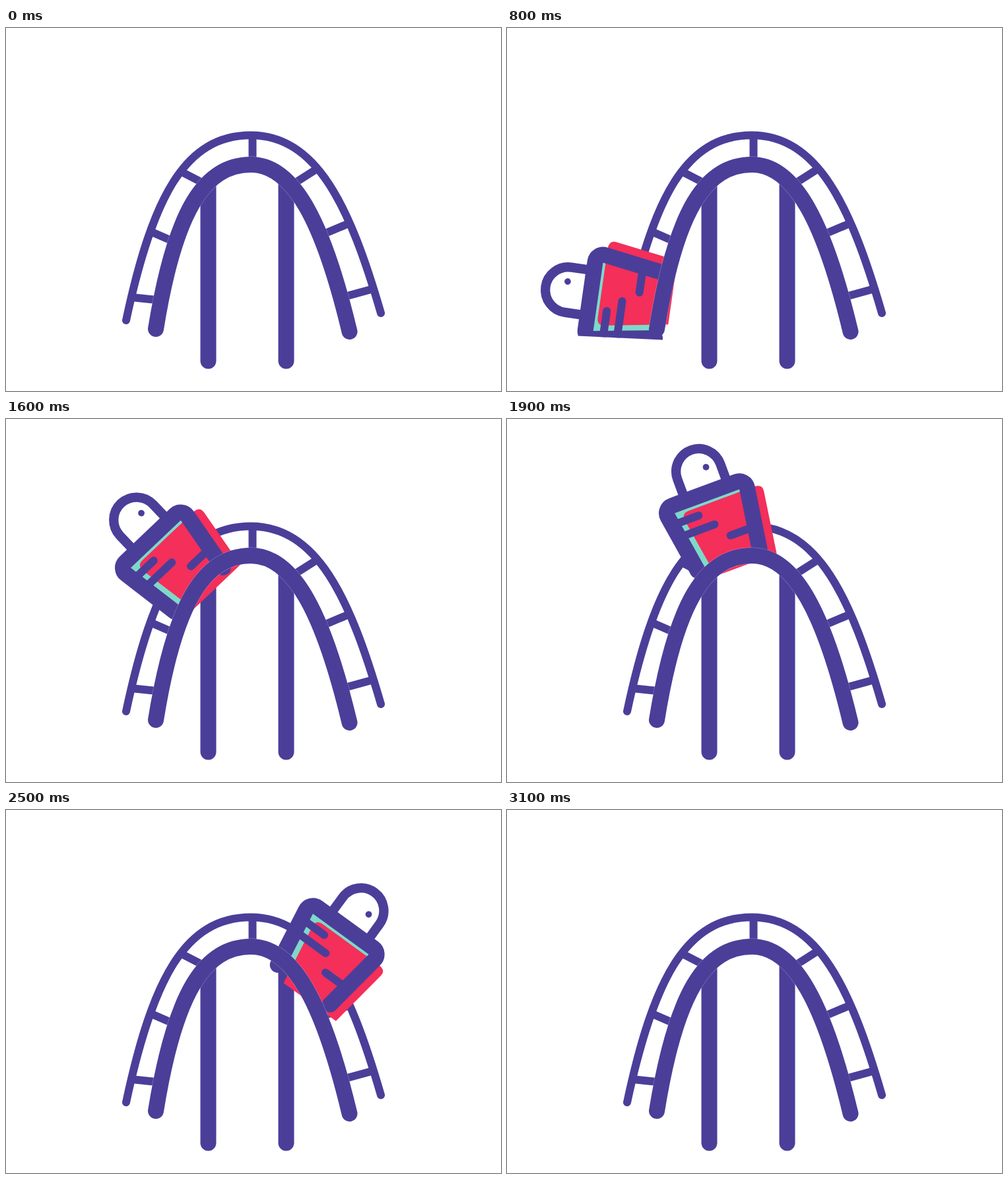
Animation of 750 by 550 pixels, one loop 3600 ms. Source, as an HTML page:

```html
<!DOCTYPE html>
<html lang="en">
<head>
<meta charset="utf-8">
<title>Bag on a roller coaster</title>
<style>
  html, body { margin: 0; width: 100%; height: 100%; overflow: hidden; background: #fff; }
  svg { display: block; width: 750px; height: 550px; }
  .line { fill: none; stroke: #4b3e99; stroke-linecap: round; }
  .thick { stroke-width: 24; }
  .thin { stroke-width: 12; }
  .flat { stroke-linecap: butt; }
  .rim { fill: none; stroke: #fff; stroke-opacity: .35; stroke-width: 25; }
</style>
</head>
<body>
<svg viewBox="0 0 750 550">
  <defs>
    <clipPath id="ground"><path id="edge"/></clipPath>
    <path id="rail" d="M227 456C256 276 301 207 371 207C436 207 481 295 520.5 460"/>
    <path id="ride" d="M161 538C190.5 279 271 152.5 371 152.5C482 152.5 556 335 578 520"/>
  </defs>

  <path class="line thick" d="M306.5 240V504.5M424.5 234V504.5"/>
  <path class="line thin" d="M182 443C222 256 271 162.5 371 162.5C471 162.5 521 270 568 432"/>
  <path class="line thin flat" d="M373.5 163V205M266 218L298 234.5M220 308.7L251 322.3M190 408L228 412
    M438 234.5L471 213.5M484 311L519 296.3M515 406.5L557 395"/>

  <g clip-path="url(#ground)">
    <g id="bag">
      <path fill="#7ed9c9" d="M329 108H438L424 206H344Z"/>
      <path fill="#f32f5a" d="M357 221L342 127Q340 114 352 114H457.5Q471.5 114 469.5 126L455 221Z"/>
      <path class="line flat" stroke-width="14.3" d="M353 98V63.5A34.5 34.5 0 0 1 422 63.5V98"/>
      <circle cx="400" cy="61" r="4.9" fill="#4b3e99"/>
      <path class="line thin" d="M328 126H364M330 147H382M399 171H436"/>
      <path class="line thick" d="M333.7 204L319.4 112A12 12 0 0 1 331.2 98H435.8A12 12 0 0 1 447.6 112L433 206"/>
    </g>
  </g>

  <use href="#rail" class="rim"/>
  <use href="#rail" class="line thick"/>
</svg>
<script>
const LOOP = 3600, STEP = 100;
const START = 200, TOP = 2100, END = 3100;
const [bag, edge, ride] = ['bag', 'edge', 'ride'].map(id => document.getElementById(id));

// Steady climb that brakes just before the top
function climb(t) {
  const time = Math.min(t, TOP);
  const brake = Math.max(0, time - 1900);
  return 475 * ((time - START) / (TOP - START)) ** 1.15 - 0.0008 * brake * brake;
}

// Eased run down the far side
function drop(t) {
  const u = Math.max(0, t - TOP) / (END - TOP);
  return 482 * (1 - Math.cos(Math.PI * u)) / 2;
}

// The bag stands upright at the crest and leans with the slope
const lean = dist => 86 * Math.sin(0.0035 * (dist - 486));

function draw(time) {
  const t = Math.floor(time / STEP) * STEP;
  const shown = t >= START && t < END;
  bag.setAttribute('visibility', shown ? 'visible' : 'hidden');
  if (!shown) return;
  const dist = climb(t) + drop(t);
  const { x, y } = ride.getPointAtLength(dist);
  bag.setAttribute('transform',
    `translate(${x} ${y}) rotate(${lean(dist)}) translate(-383.5 -153.5)`);
  const sink = 18 * Math.max(0, (700 - t) / 500);
  edge.setAttribute('d', `M0 0H750V481H375V${479 + sink}L0 ${461.5 + sink}Z`);
}

const origin = performance.now();
function tick() {
  draw((performance.now() - origin) % LOOP);
  requestAnimationFrame(tick);
}
tick();
</script>
</body>
</html>
```
